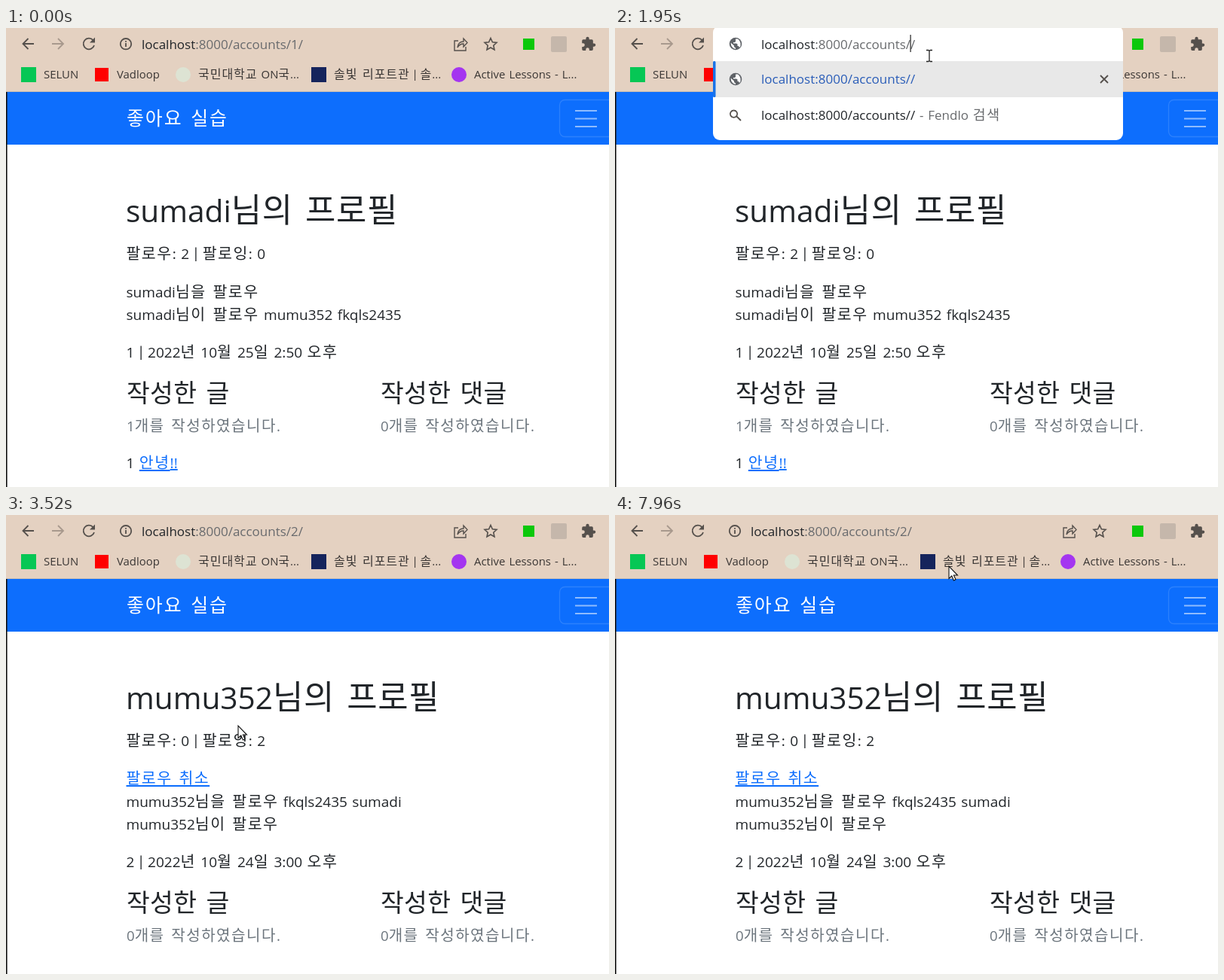
An HTML page that plays this animation: 800x610 px, repeating every 8 s.

```html
<!DOCTYPE html>
<html lang="ko">
<head>
<meta charset="utf-8">
<style>
  html, body { margin: 0; width: 100%; height: 100%; overflow: hidden; background: #fff; }
  svg { display: block; }
  text { font-family: "Open Sans", sans-serif; word-spacing: .08em; }
  .ko { font-family: "Noto Sans CJK KR", "Noto Sans CJK", sans-serif; font-size: 1.08em; letter-spacing: var(--gap); }
  .bar { font-family: Lato, sans-serif; }
  .brand { font-weight: 500; }
  .link { fill: #0d6efd; text-decoration: underline; text-decoration-thickness: 1.5px; text-underline-offset: 3px; }
  .hover { fill: #0a58ca; }
  .bold { font-weight: 700; fill: #2a5db8; }
  .blue { fill: #2a5db8; }
  .dim { fill: #686a6d; }
  .icon { fill: none; stroke: #55504c; stroke-width: 1.8; }
</style>
</head>
<body>
<svg id="stage" width="800" height="610" viewBox="0 0 800 610"></svg>
<script>
const LOOP = 8000;
const USER = 'sumadi', OTHER = 'mumu352', FRIEND = 'fkqls2435';
const INK = '#212529', MUTED = '#6c757d';

const span = (cls, content) => `<tspan class="${cls}">${content}</tspan>`;
const text = (x, y, size, content, fill = INK, gap = 1.5) =>
  `<text x="${x}" y="${y}" font-size="${size}" fill="${fill}" style="--gap:${gap}px">${
    content.replace(/[가-힣]+( [가-힣]+)*/g, span('ko', '$&')).replace(/\|/g, span('bar', '|'))}</text>`;
const rect = (x, y, w, h, fill, rx = 0, extra = '') =>
  `<rect x="${x}" y="${y}" width="${w}" height="${h}" fill="${fill}" rx="${rx}" ${extra}/>`;
const circle = (x, y, r, fill) => `<circle cx="${x}" cy="${y}" r="${r}" fill="${fill}"/>`;
const icon = (d, extra = '') => `<path class="icon" d="${d}" ${extra}/>`;
const within = (t, spans) => spans.some(([from, to]) => t >= from && t < to);

// Pointer positions: time, x, y, shape
const pointer = [
  [0, 0, 0, 'none'],
  [200, 452, 545, 'arrow'], [290, 450, 512, 'arrow'], [390, 446, 440, 'arrow'],
  [490, 440, 335, 'arrow'], [590, 432, 225, 'arrow'], [680, 425, 130, 'arrow'],
  [780, 419, 62, 'arrow'], [880, 417, 37, 'beam'],
  [3320, 408, 62, 'arrow'], [3420, 372, 150, 'arrow'], [3520, 308, 280, 'arrow'],
  [3620, 256, 378, 'arrow'], [3720, 232, 372, 'arrow'], [3820, 222, 353, 'hand'],
  [4410, 212, 352, 'hand'], [4510, 196, 352, 'hand'], [4610, 188, 352, 'hand'],
  [7590, 208, 334, 'arrow'], [7680, 270, 264, 'arrow'], [7780, 360, 164, 'arrow'],
  [7870, 425, 90, 'arrow'], [7960, 443, 68, 'arrow']
];
const shapes = {
  none: '',
  arrow: '<path d="M0 0V16.5L3.8 13 6.4 19 9 17.8 6.4 12H11.5Z" fill="#fff" stroke="#111" stroke-width="1.1"/>',
  beam: '<path d="M-4-7.5H-1.3L0-6.5 1.3-7.5H4M0-6.5V6.5M-4 7.5H-1.3L0 6.5 1.3 7.5H4" fill="none" stroke="#222" stroke-width="1.3"/>',
  hand: '<path d="M-2 14V2Q-2 .5 0 .5T2 2V8Q5 6.5 5.5 9 8.5 7.5 9 10.5 12 9.5 12 12V17Q12 19 10 21V23.5H0V21L-5 14.5Q-5.5 12-3.5 12Z" fill="#fff" stroke="#111" stroke-width="1.2"/><path d="M2 8V13M5.5 9.5V13M9 10.5V13" stroke="#111"/>'
};
function cursor(t) {
  const [, x, y, shape] = pointer.findLast(p => t >= p[0]);
  return `<g transform="translate(${x} ${y})">${shapes[shape]}</g>`;
}

const globe = y => `<g transform="translate(160 ${y})">${circle(0, 0, 8.3, '#5f6368')}
  <path d="M-6.5-1.5-2 2.5V4L0 5.5V7Q-6 6-6.5-1.5ZM0-6.5H3Q6-4 6.5-1V3L5 5 4 3H2.5V.5L1-.5H-3V-2H-1L0-3Z" fill="#fff"/></g>`;

const address = id => 'localhost' + span('dim', `:8000/accounts/${id}/`);

function toolbar(t) {
  const focused = within(t, [[980, 2830]]);
  const selected = within(t, [[980, 1370]]);
  const loading = within(t, [[4010, 4110], [5610, 5710], [6500, 6600], [7400, 7500]]);
  const id = t < 2830 ? 1 : 2;
  return rect(0, 0, 800, 84, '#e4d1c1') + rect(0, 84, 800, 1, '#c9bdb2') +
    icon('M37 21H23M29.5 14 22.5 21 29.5 28') +
    icon('M61 21H75M69 14 76 21 69 28', 'style="stroke:#a8998d"') +
    (loading ? icon('M104 15 116 27M116 15 104 27')
      : icon('M115.5 16.2A7.3 7.3 0 1 0 117 23') + '<path d="M118 12.5V19.5H111Z" fill="#55504c"/>') +
    (focused ? rect(137.5, 4.2, 528, 35.5, '#fff', 17.7, 'stroke="#1c5bb8" stroke-width="2.6"') : '') +
    icon('M159 14A7.2 7.2 0 1 0 159 28.4A7.2 7.2 0 1 0 159 14M159 20V25M159 17V18.8') +
    (selected ? rect(180, 8, 214, 27, '#0078d7') +
        text(180, 28, 17, `localhost:8000/accounts/${id}/`, '#fff')
      : text(180, 28, 17, address(id))) +
    (within(t, [[1370, 1950]]) ? rect(t < 1560 ? 393 : 387.3, 9, 1.2, 23, '#222') : '') +
    icon('M600 17H595V30H610V25M599 26Q600 18 607 18V14L612 19.5 607 25V21Q602 21 599 26Z', 'style="stroke-width:1.4"') +
    icon('M643 13.5 645.4 18.8 651 19.4 646.8 23.2 648 29 643 26 638 29 639.2 23.2 635 19.4 640.6 18.8Z', 'style="stroke-width:1.6"') +
    rect(686, 14, 15, 15, '#0bc80b') + rect(723, 11, 21, 21, '#c5b7ab', 2) +
    `<path transform="translate(762.5 11) scale(.86)" fill="#55504c" d="M20.5 11H19V7q0-2-2-2h-4V3.5a2.5 2.5 0 0 0-5 0V5H4q-2 0-2 2v3.8h1.5a2.7 2.7 0 0 1 0 5.4H2V20q0 2 2 2h3.8v-1.5a2.7 2.7 0 0 1 5.4 0V22H17q2 0 2-2v-4h1.5a2.5 2.5 0 0 0 0-5z"/>` +
    bookmarks();
}

function bookmarks() {
  const label = (x, name) => text(x, 67, 14.9, name, '#3a3634', .9);
  return rect(20, 52, 20, 20, '#06c755') + label(50, 'SELUN') +
    rect(118, 53, 18, 18, '#f00') + label(147, 'Vadloop') +
    circle(235, 62, 10, '#dde3d3') + label(255, '국민대학교 ON국...') +
    rect(405, 52, 20, 20, '#15245c') + label(435, '솔빛 리포트관 | 솔...') +
    circle(601, 62, 10, '#a435f0') + label(621, 'Active Lessons - L...');
}

const navbar = () => rect(0, 85, 800, 70, '#0d6efd') +
  text(160, 129, 23.1, span('brand', '좋아요 실습'), '#fff', 1.9) +
  rect(734.5, 95.5, 80, 49, 'none', 7, 'stroke="#fff" stroke-opacity=".13" stroke-width="1.3"') +
  '<path d="M755 110H784M755 120.5H784M755 131H784" stroke="#8fbcfe" stroke-width="2.2"/>' +
  rect(0, 85, 1.6, 525, '#111');

function profile(t) {
  const line = (y, content) => text(159.5, y, 19, content);
  const counts = (followers, following) => line(307, `팔로우: ${followers} | 팔로잉: ${following}`);
  const title = name => text(159, 258, 40.6, `${name}님의 프로필`, INK, .7);
  const columns = (y, posts) => ['글', '댓글'].map((kind, i) => {
    const x = 160 + i * 337;
    return text(x, y, 31, `작성한 ${kind}`, INK, .3) +
      text(x, y + 39, 18.6, `${i ? 0 : posts}개를 작성하였습니다.`, MUTED);
  }).join('');

  if (t < 2830) {
    return title(USER) + counts(2, 0) + line(358, `${USER}님을 팔로우`) +
      line(388, `${USER}님이 팔로우 ${OTHER} ${FRIEND}`) +
      line(438, '1 | 2022년 10월 25일 2:50 오후') + columns(497, 1) +
      line(585, '1 ' + span('link', '안녕!!'));
  }
  const following = !within(t, [[4110, 5710], [6600, 7500]]);
  const hover = within(t, [[3820, 4110], [4510, 5710], [6400, 6600], [7200, 7500]]);
  return title(OTHER) + counts(0, following ? 2 : 1) +
    line(357, span(hover ? 'link hover' : 'link', following ? '팔로우 취소' : '팔로우')) +
    line(388, `${OTHER}님을 팔로우 ${FRIEND}${following ? ' ' + USER : ''}`) +
    line(418, `${OTHER}님이 팔로우`) +
    line(468, '2 | 2022년 10월 24일 3:00 오후') + columns(527, 0);
}

function suggestions(t) {
  if (!within(t, [[1950, 2920]])) return '';
  const typed = t >= 2330, closing = t >= 2830;
  const id = typed ? 2 : '';
  const bottom = typed ? 197 : 149;
  const url = `localhost:8000/accounts/${id}/`;
  const row = (y, content) => text(194, y, 17, content);
  const shadow = within(t, [[2040, 2830]])
    ? rect(126, -10, 552, bottom + 28, '#000', 14, 'opacity=".1"') +
      rect(129, -10, 546, bottom + 19, '#000', 11, 'opacity=".13"') : '';
  const panel = rect(130, -3, 544, bottom + 3, '#fff', 9) +
    rect(130, 44, 544, 48, '#e8e8e8') + rect(130, 44, 3.5, 48, '#1a73e8', 1.5);
  const input = closing ? '' : globe(21) + row(28, address(id)) +
    rect(typed ? 401.3 : 391.5, 9, 1.2, 23, '#222');
  const match = `Document ${span('dim', '-')} ${span('bold', url)}`;
  const rows = globe(68) + row(74, typed ? match : span('blue', url)) +
    icon('M644 63 654 73M654 63 644 73') +
    icon('M157.5 109.5A4.7 4.7 0 1 0 157.6 109.5M161.5 117.5 167 123') +
    row(122, url + span('dim', ' - Fendlo 검색')) +
    (typed ? globe(163) + row(169, match + span('blue', 'follow/')) : '');
  return `<g opacity="${closing ? .12 : 1}">${shadow}${panel}${input}${rows}</g>`;
}

const stage = document.getElementById('stage');
let shown = '';
function draw(now) {
  const t = now % LOOP;
  const scene = navbar() + profile(t) + toolbar(t) + suggestions(t) + cursor(t);
  if (scene !== shown) stage.innerHTML = shown = scene;
  requestAnimationFrame(draw);
}
draw(0);
</script>
</body>
</html>
```
